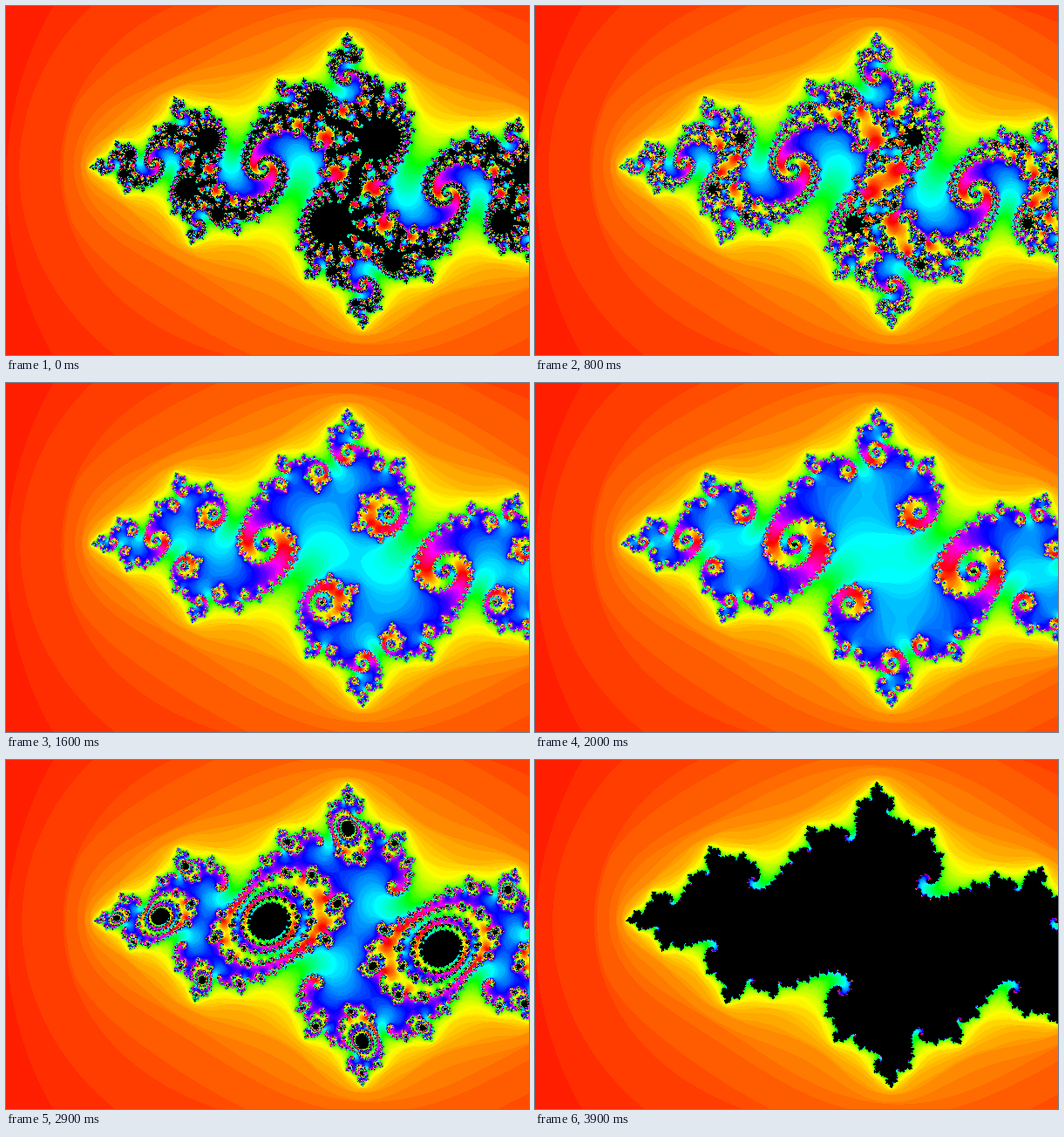
Animation of 600x400 px, one loop 4000 ms. Source, as an HTML page with a canvas:

```html
<!DOCTYPE html>
<html lang="en">
<head>
<meta charset="utf-8">
<title>Julia set</title>
<style>
  html, body { margin: 0; width: 100%; height: 100%; overflow: hidden; background: #000; }
  canvas { display: block; width: 600px; height: 400px; }
</style>
</head>
<body>
<canvas id="view" width="600" height="400"></canvas>
<script>
const W = 600, H = 400, FRAMES = 40, STEP = 100, MAX_ITER = 100;
const BLACK = 0xff000000;
const ctx = document.getElementById('view').getContext('2d');
const cache = [];

// Fully saturated hue (0..1) packed as ABGR.
function hueColor(h) {
  const channel = shift => {
    const k = (h * 6 + shift) % 6;
    return Math.floor(255 * (1 - Math.max(0, Math.min(k, 4 - k, 1))));
  };
  return (BLACK | channel(1) << 16 | channel(3) << 8 | channel(5)) >>> 0;
}

const palette = Array.from({ length: 260 }, (_, i) => hueColor((i / 100) % 1));

function juliaColor(x, y, cx, cy) {
  let n = 0, xx = x * x, yy = y * y;
  while (xx + yy <= 4 && n < MAX_ITER) {
    y = 2 * x * y + cy;
    x = xx - yy + cx;
    xx = x * x;
    yy = y * y;
    n++;
  }
  if (n === MAX_ITER) return BLACK;
  const m = n + 1 - Math.log(Math.log2(xx + yy) / 2);
  return palette[Math.max(0, Math.floor(255 * m / MAX_ITER))];
}

// The constant drifts along the real axis, gaining speed.
function render(frame) {
  const cx = -0.8 + 0.0005 * frame + 0.000047 * frame * frame, cy = -0.156;
  const image = ctx.createImageData(W, H);
  const pixels = new Uint32Array(image.data.buffer);
  for (let py = 0, i = 0; py < H; py++) {
    for (let px = 0; px < W; px++) {
      pixels[i++] = juliaColor(px / 200 - 2, py / 200 - 1, cx, cy);
    }
  }
  return image;
}

let shown = -1;
function draw(now) {
  const frame = Math.floor(now / STEP) % FRAMES;
  if (frame !== shown) {
    cache[frame] = cache[frame] || render(frame);
    ctx.putImageData(cache[frame], 0, 0);
    shown = frame;
  }
}

const start = performance.now();
function tick() {
  draw(performance.now() - start);
  requestAnimationFrame(tick);
}
tick();
</script>
</body>
</html>
```
